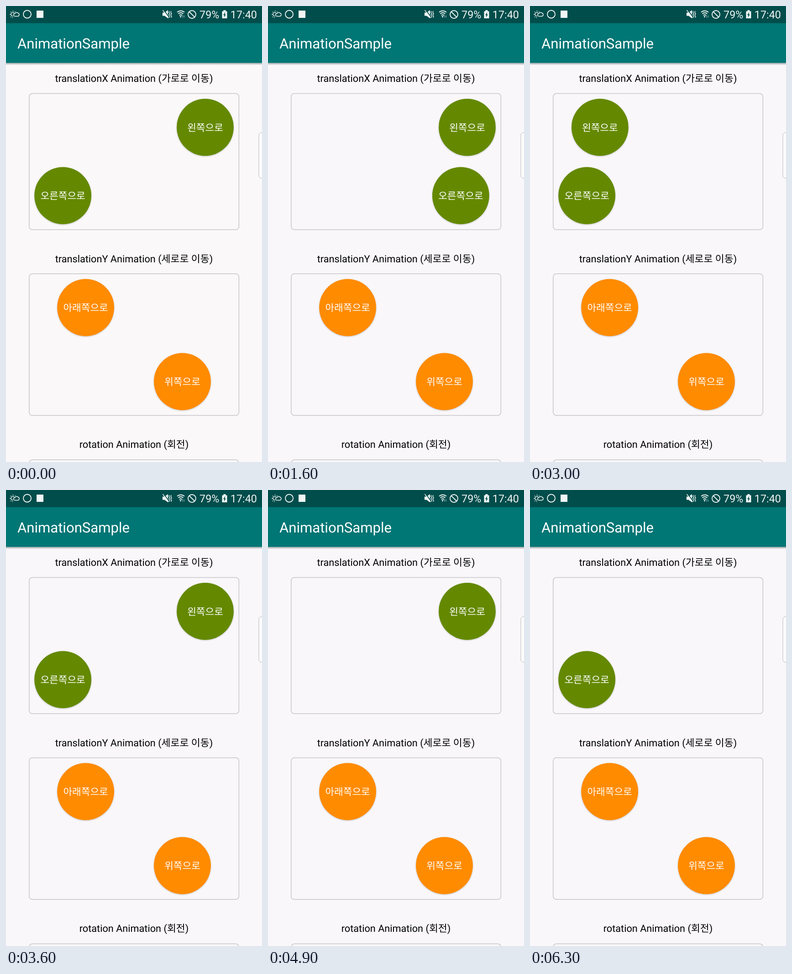
Write an HTML page that moves like this. It is 561 px wide and 998 px high and loops after 6400 ms.

```html
<!DOCTYPE html>
<html lang="ko">
<head>
<meta charset="utf-8">
<title>AnimationSample</title>
<style>
  html, body { margin: 0; width: 100%; height: 100%; overflow: hidden; background: #f9f7fa; }
  svg { display: block; width: 100%; height: 100%; }
  text {
    font-family: Roboto, "Noto Sans CJK KR", "Noto Sans CJK", sans-serif;
    font-size: 21.7px;
    text-rendering: geometricPrecision;
  }
  .mid { text-anchor: middle; }
  .box { fill: none; stroke: #c6c5c8; stroke-width: 1.5; }
  .ball circle { filter: drop-shadow(0 1.8px 1.8px rgba(0, 0, 0, .23)); }
  .ball text { fill: #fff; font-size: 21.4px; }
  .line { fill: none; stroke: #f1f6f6; stroke-width: 1.8; }
  .thin { stroke-width: 1.4; }
  .solid { fill: #f1f6f6; }
  .status { font-size: 23.4px; }
</style>
</head>
<body>
<svg viewBox="0 0 561 998" preserveAspectRatio="none">
  <defs>
    <clipPath id="inner"><rect x="50" y="191" width="461" height="299"/></clipPath>
    <linearGradient id="shade" x2="0" y2="1">
      <stop offset="0" stop-opacity=".34"/>
      <stop offset="1" stop-opacity="0"/>
    </linearGradient>
  </defs>
  <rect id="page" width="561" height="998" fill="#faf8f8"/>

  <rect y="124.6" width="561" height="5" fill="url(#shade)"/>
  <rect width="561" height="124.6" fill="#007675"/>
  <rect width="561" height="37.5" fill="#004d4b"/>
  <text x="25" y="93" fill="#fff" style="font-size:31.1px">AnimationSample</text>

  <!-- status icons, left -->
  <g class="line thin">
    <path d="M15.5 22a4 4 0 1 1 2.5-6.5M8 18.500h1.800M10 12.500l1.300 1.300M15.500 10v2M20.500 12l-1 1.300M10 24.500l1.300-1.300M14.500 24.500v1.800"/>
    <path d="M19.500 22.500a3 3 0 0 1 .3-6a4 4 0 0 1 6.500-1a3.600 3.600 0 0 1-.3 7z"/>
  </g>
  <circle class="line" cx="46.500" cy="18" r="8.500"/>
  <rect class="solid" x="67" y="10" width="15" height="16"/>

  <!-- status icons, right -->
  <path class="solid" d="M343 14.500h4.500l7.500-5.500v18l-7.500-5.500h-4.500z"/>
  <path d="M345 8l13 17" stroke="#004d4b" stroke-width="1.800"/>
  <path class="line thin" d="M343.500 9l13 17M358 11l-1 3 2 3-2 3 2 3-1 2.500M362 11l-1 3 2 3-2 3 2 3-1 2.500"/>
  <path class="line" d="M375 13.500q8-6 16 0M377.500 17q5.500-4.500 11 0M380 20.500q3-2.500 6 0"/>
  <path class="solid" d="M380.500 22h4l-2 4z"/>
  <path d="M387 26v-5l-1.500 1.500M390 20v5l1.500-1.500" fill="none" stroke="#8fb5b4"/>
  <g class="line">
    <circle cx="407.500" cy="18.500" r="8.500"/>
    <path d="M401.500 12.500l12 12"/>
  </g>
  <path class="solid" d="M476.500 9h5v2.500h3V27h-11V11.500h3z"/>
  <path d="M480.500 13l-4.500 7h2.500l-1 5.500 4.500-7h-2.500z" fill="#004d4b"/>
  <text class="solid status" x="424" y="27">79%</text>
  <text class="solid status" x="550" y="27" text-anchor="end">17:40</text>

  <g class="mid">
    <text x="280.500" y="166">translationX Animation (가로로 이동)</text>
    <text x="280.500" y="560.500">translationY Animation (세로로 이동)</text>
    <text x="280.500" y="967">rotation Animation (회전)</text>
  </g>
  <rect class="box" x="50.800" y="191.500" width="459.600" height="298" rx="7"/>
  <rect class="box" x="50.800" y="586" width="459.600" height="310" rx="7"/>
  <rect class="box" x="50.800" y="993.300" width="459.600" height="300" rx="7"/>
  <g id="green" class="mid" clip-path="url(#inner)"></g>
  <g id="orange" class="mid"></g>
  <rect x="554" y="277" width="20" height="100" rx="6" fill="#fcfbfc" stroke="#b9b9bb"/>
</svg>
<script>
const $ = id => document.getElementById(id);
const LOOP = 6400, STEP = 100, RUN = 1000, REACH = 623;

function ball(parent, x, y, color, label) {
  const g = document.createElementNS("http://www.w3.org/2000/svg", "g");
  g.setAttribute("class", "ball");
  g.innerHTML = `<circle cx="${x}" cy="${y}" r="62.4" fill="${color}"/>` +
    `<text x="${x}" y="${y + 8.3}">${label}</text>`;
  $(parent).append(g);
  return g;
}

const left = ball("green", 436.5, 265.5, "#648900", "왼쪽으로");
const right = ball("green", 124.6, 415, "#648900", "오른쪽으로");
ball("orange", 174.6, 660, "#ff8b00", "아래쪽으로");
ball("orange", 386.5, 822, "#ff8b00", "위쪽으로");

// Accelerate-decelerate slide; snaps home when the run ends.
function slide(t, starts) {
  const start = starts.find(s => t >= s && t < s + RUN);
  return start === undefined ? 0 : REACH * (1 - Math.cos(Math.PI * (t - start) / RUN)) / 2;
}

function draw(now) {
  const t = Math.floor(now % LOOP / STEP) * STEP;
  right.setAttribute("transform", `translate(${slide(t, [1114, 3947])})`);
  left.setAttribute("transform", `translate(${-slide(t, [2529, 5380])})`);
  $("page").setAttribute("fill", t < 1000 ? "#faf8f8" : "#f9f7fa");
}

let begin;
function tick(now) {
  begin ??= now;
  draw(now - begin);
  requestAnimationFrame(tick);
}
draw(0);
requestAnimationFrame(tick);
</script>
</body>
</html>
```
